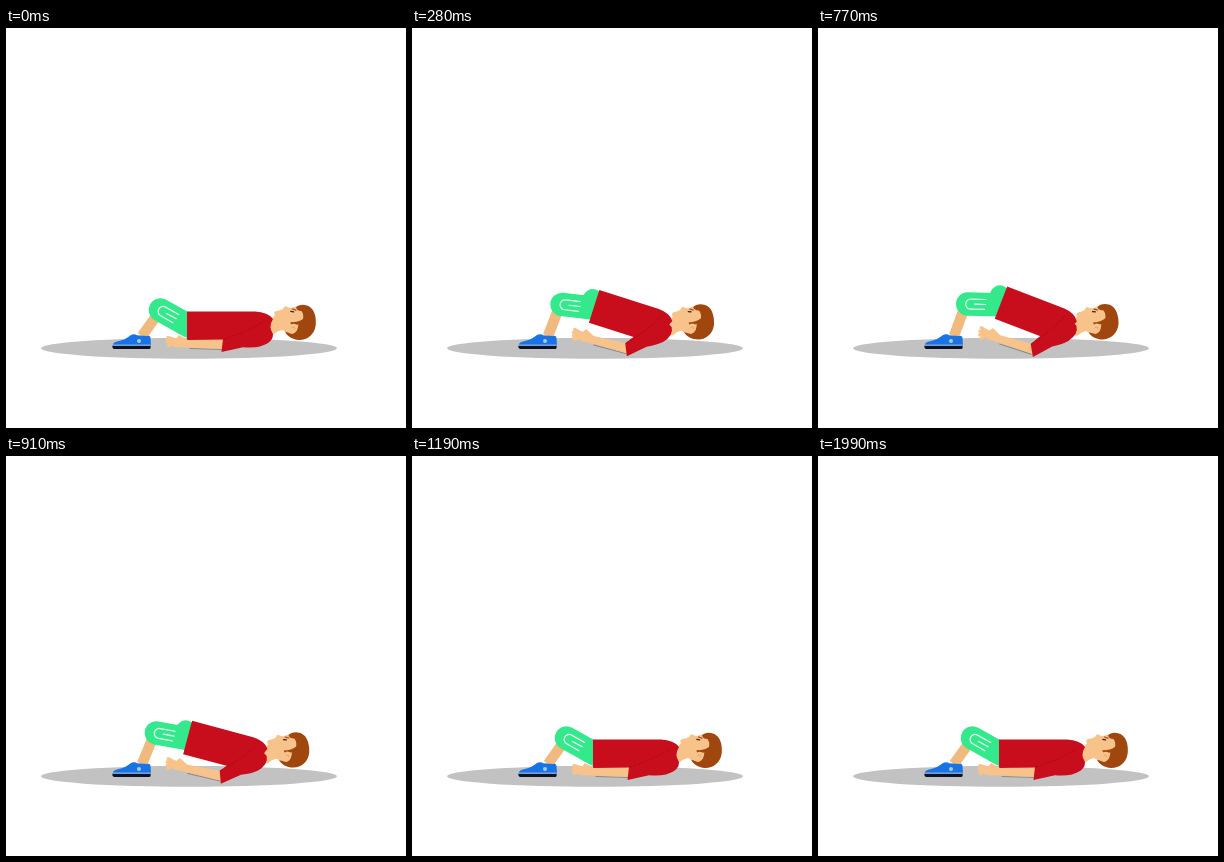
An HTML page that plays this animation: 400x400 px, repeating every 2060 ms.

```html
<!DOCTYPE html>
<html lang="en">
<head>
<meta charset="utf-8">
<title>Glute bridge</title>
<style>
  html, body { margin: 0; width: 100%; height: 100%; overflow: hidden; background: #fff; }
  svg { display: block; width: 100vw; height: 100vh; --v: 0; }
  .skin { fill: #f8c28b; }
  .shirt { fill: #c80d1c; }
  .shorts { fill: #34e88c; }
  .hair { fill: #a0470f; }
  .line { fill: none; stroke-linecap: round; stroke-linejoin: round; }

  /* --v is the lift: 0 lying, 1 raised */
  .torso, .upper { transform-origin: 250px 300px; }
  .torso {
    transform: translate(calc(var(--v) * -10.7px), calc(var(--v) * -4.6px))
      rotate(calc(var(--v) * 26deg)) scaleX(calc(1 - var(--v) * .12));
  }
  .upper {
    transform: translate(calc(var(--v) * -10.7px), calc(var(--v) * -4.6px))
      rotate(calc(var(--v) * -20deg));
  }
  .fore { transform-origin: 217px 317px; transform: rotate(calc(var(--v) * 40deg)); }
  .finger {
    transform-origin: 173px 313px;
    transform: rotate(calc((1.5 - var(--i)) * (13deg + var(--v) * 6deg) - 3deg - var(--v) * 12deg));
  }
  .head {
    transform-origin: 266px 298px;
    transform: translate(calc(var(--v) * -11px), calc(var(--v) * 2.2px)) rotate(calc(var(--v) * -6deg));
  }
</style>
</head>
<body>
<svg viewBox="0 0 400 400">
  <ellipse cx="183" cy="320.3" rx="148" ry="10.4" fill="#c2c2c2"/>

  <line id="shin" x1="136" y1="308" stroke="#f0b97d" stroke-width="10.5"/>
  <path d="M107 318 Q106 314.5 111 313.5 Q119 312 125 307 Q128 305.3 131 307.2 L141 308 Q144.5 307 144.6 311 L145 318 Z" fill="#1873e6"/>
  <path d="M106.3 317.6 H144.6 V319.7 Q144.5 321 143 321 H108 Q106 320.6 106.3 317.6 Z" fill="#0a1426"/>
  <path class="line" d="M107 317.2 H144.4" stroke="#dbe8f8" stroke-width=".8"/>
  <circle cx="133" cy="313" r="2" fill="#a9cbf5"/>

  <g class="head">
    <path class="skin" d="M256 290 L266 291 L269 287 Q267 284.5 270 283 L273.5 282.5 L277 281 Q279 276.5 281.5 279.3 L285 280 L292 278 L301 284 L299 300 L290 307 L282 305 L276 302 Q271 303 268 306 L256 305 Z"/>
    <path class="hair" d="M290 279.5 C293 275.5 301 276.4 304.5 279.4 C309 282.5 310.6 291 309.6 298 C308 307 301 312.2 293 312 C286 311.4 281 308 279 303.5 L286 306 C291 305 292 300 292.4 296.5 L285.3 297.3 L284.3 294.3 Q292 294.5 297 291 Q298 286 295.5 283 Q291 283 290 279.5 Z"/>
    <path class="skin" d="M283 298 Q287 294 290.5 296.8 Q292.5 302 288.5 304.5 Q284.5 304 283 298 Z"/>
    <path class="line" d="M286 299.5 Q288.5 297.5 289 301" stroke="#dd9c62" stroke-width=".8"/>
    <path class="line" d="M286.5 281 L290 282.2" stroke="#9a3c10" stroke-width="1.1"/>
    <path class="line" d="M284.8 283.4 L287.6 283.8" stroke="#3a2114" stroke-width="1.3"/>
  </g>

  <circle class="torso shorts" cx="177" cy="295.3" r="11"/>
  <line id="thigh" class="line" stroke="#34e88c" stroke-width="23.4"/>
  <g id="stripe" class="line" stroke="#e9fff3" stroke-width="1.2">
    <path d="M18 -5 H3 A5 5 0 0 0 3 5 H17 M18 0 H7"/>
  </g>

  <path class="torso shirt" d="M181 283.5 H249 Q262 284 267 291 Q262 299 267 306 Q267 317 250 318 H181 Z"/>

  <g class="upper">
    <g id="fore" class="fore">
      <path class="line" d="M184 320.5 L217 321.5" stroke="#8b8b8b" stroke-width="1.2"/>
      <path class="skin" d="M173 307 L182 312 L219 311.5 V321 L178 319.5 Q168 320 165 317 Z"/>
    </g>
    <path class="shirt" d="M217 311 L215.5 324 L237 319.3 Q248 320 254 318.5 Q266 315 266 306 L258 293 Z"/>
    <path class="line" d="M218 311 Q246 302 258 293" stroke="#9c0814" stroke-width=".6" stroke-dasharray="2 2.4"/>
  </g>
</svg>
<script>
const LOOP = 2060, STEP = 70, TOP = 560, DOWN = 1190;
const svg = document.querySelector('svg');
const $ = id => document.getElementById(id);

function set(el, attrs) {
  for (const k in attrs) el.setAttribute(k, attrs[k]);
}

for (let i = 0; i < 4; i++) {
  const finger = document.createElementNS(svg.namespaceURI, 'line');
  set(finger, { class: 'finger line', x1: 173, y1: 313, x2: 161.5, y2: 313,
    stroke: '#f8c28b', 'stroke-width': 3.4, style: `--i:${i}` });
  $('fore').append(finger);
}

function lift(t) {
  if (t >= DOWN) return 0;
  return 1.05 * (t <= TOP
    ? 1 - Math.pow(1 - t / TOP, 1.5)
    : 1 - Math.pow((t - TOP) / (DOWN - TOP), 1.35));
}

function pose(v) {
  svg.style.setProperty('--v', v);
  // the knee leads the hip
  const lead = v * (2 - v);
  const knee = { x: 154.5 - 5 * lead, y: 282 - 6.2 * lead };
  const hip = { x: 183 + v, y: 298 - 26 * v };
  const turn = Math.atan2(hip.y - knee.y, hip.x - knee.x) * 180 / Math.PI;
  set($('shin'), { x2: knee.x - 2 * lead, y2: knee.y });
  set($('thigh'), { x1: knee.x, y1: knee.y, x2: hip.x, y2: hip.y });
  set($('stripe'), { transform: `translate(${knee.x} ${knee.y}) rotate(${turn})` });
}

const start = performance.now();
function draw() {
  const t = Math.max(0, performance.now() - start) % LOOP;
  pose(lift(Math.floor(t / STEP) * STEP));
  requestAnimationFrame(draw);
}
draw();
</script>
</body>
</html>
```
